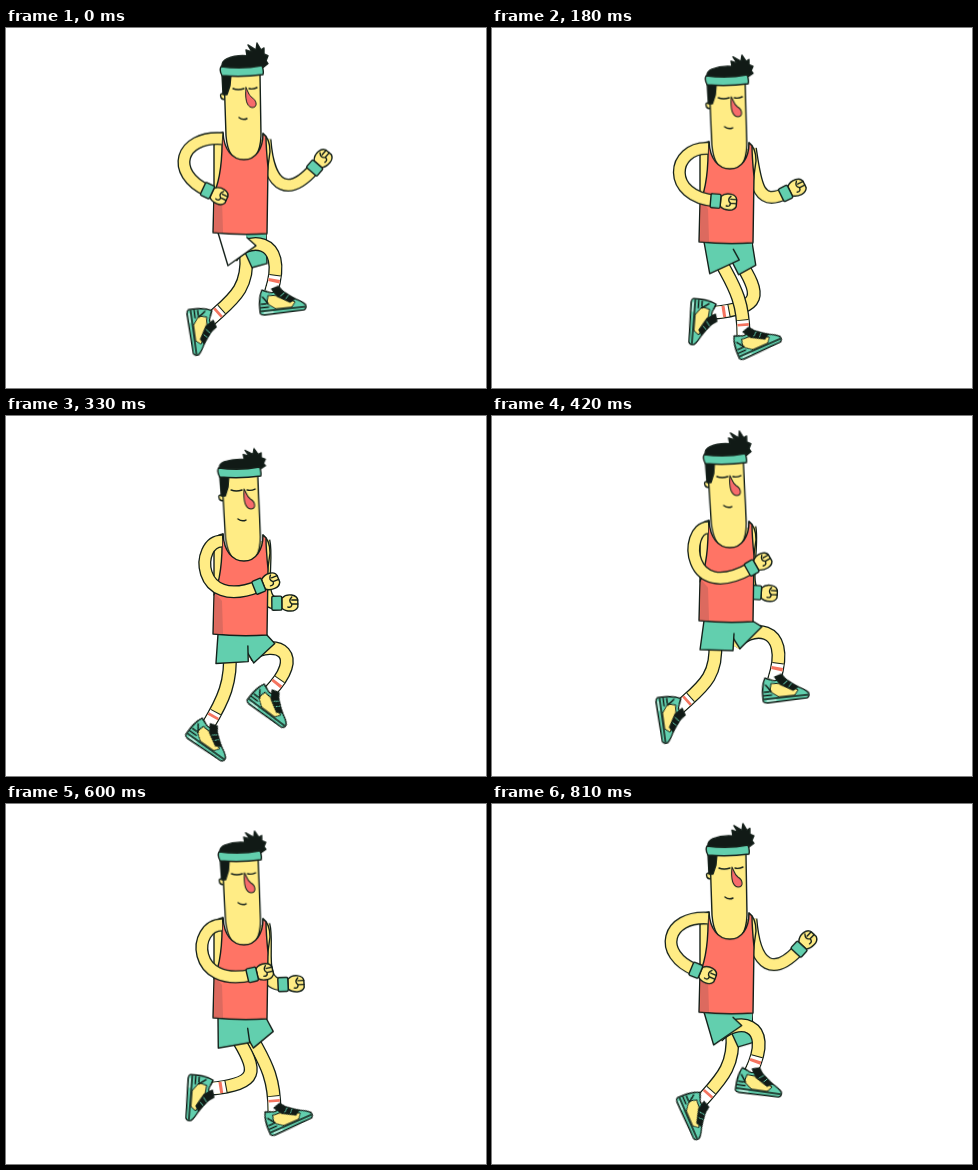
Write an HTML page without scripts that moves like this. It is 480 px wide and 360 px high and loops after 840 ms.

```html
<!DOCTYPE html>
<html lang="en">
<head>
<meta charset="utf-8">
<title>Runner</title>
<style>
html, body { margin: 0; width: 100%; height: 100%; overflow: hidden; background: #fff; }
svg { display: block; width: 480px; height: 360px; }

.ink { stroke: #14201a; stroke-width: 1.4; stroke-linejoin: round; stroke-linecap: round; }
.line { fill: none; }
.skin { fill: #ffec85; }
.teal { fill: #62cfae; }
.red { fill: #ff7465; }
.black { fill: #111a16; }

/* limbs are layered strokes along one moving centreline */
.limb path { fill: none; stroke-width: 11.4; }
.limb .edge { stroke: #14201a; stroke-width: 14; }
.limb .tube { stroke: #ffec85; }
.limb .sock { stroke: #fff; stroke-dasharray: 0 81 19; }
.limb .stripe { stroke: #f4745f; stroke-dasharray: 0 85 3.5 11.5; }
.limb .cuff { stroke: #14201a; stroke-dasharray: 0 80 1.2 18.8; }
.arm .edge { stroke-width: 13; }
.arm .tube { stroke-width: 10.4; }

/* both legs share one stride, half a cycle apart */
.leg path { animation: stride .84s linear var(--phase, 0s) infinite; }
.leg .foot { animation: step .84s linear var(--phase, 0s) infinite; }
.leg.far { --phase: -.42s; }
@keyframes stride {
  0%, 100% { d: path("M225 230C238 208 284 206 265 264"); }
  10.7% { d: path("M226 224C252 226 270 246 267 283"); }
  21.4% { d: path("M229 234C240 255 252 270 252 307"); }
  32.1% { d: path("M224 240C226 268 224 292 212 322"); }
  50% { d: path("M223 226C226 262 208 272 187 292"); }
  60.7% { d: path("M226 222C240 268 226 272 188 279"); }
  71.4% { d: path("M230 232C252 268 254 280 203 285"); }
  85.7% { d: path("M225 242C262 226 282 250 240 280"); }
}
@keyframes step {
  0%, 100% { transform: translate(265px, 264px) rotate(-6deg); }
  10.7% { transform: translate(267px, 283px) rotate(-18deg); }
  21.4% { transform: translate(252px, 307px) rotate(-24deg); }
  32.1% { transform: translate(212px, 322px) rotate(3deg); }
  50% { transform: translate(187px, 292px) rotate(82deg); }
  60.7% { transform: translate(188px, 279px) rotate(105deg); }
  71.4% { transform: translate(203px, 285px) rotate(95deg); }
  85.7% { transform: translate(240px, 280px) rotate(52deg); }
}

/* arms, shorts and head swing to and fro once per stride */
.swing { animation: var(--move) .42s ease-in-out -.82s infinite alternate; }
.arm.near { --move: near-arm; }
.arm.far { --move: far-arm; }
.shorts.near { --move: near-shorts; }
.shorts.far { --move: far-shorts; }
.head { --move: lean; transform-origin: 238px 130px; }
@keyframes near-arm {
  from { d: path("M216 111C174 108 163 145 201 163"); animation-timing-function: ease-in; }
  55% { d: path("M216 112C184 112 182 172 242 165"); animation-timing-function: ease-out; }
  to { d: path("M216 112C192 112 194 190 260 152"); }
}
@keyframes far-arm {
  from { d: path("M259 112C263 165 285 168 309 140"); animation-timing-function: ease-in; }
  55% { d: path("M258 112C264 132 250 172 281 170"); animation-timing-function: ease-out; }
  to { d: path("M258 112C262 130 250 176 264 177"); }
}
@keyframes near-shorts {
  from { d: path("M212 205L222 238L250 218L241 210"); }
  to { d: path("M212 205L208 234L241 235L242 218"); }
}
@keyframes far-shorts {
  from { d: path("M260 205L261 236L246 240L230 205"); }
  to { d: path("M260 205L270 211L248 233L230 205"); }
}
@keyframes lean { to { transform: skewX(1.8deg); } }

/* two bounces per stride: slow landing, quick lift */
.bounce { animation: bounce .42s -.38s infinite; }
.hair { animation: squash .42s -.38s infinite; transform-origin: 238px 40px; }
.bounce, .hair { animation-timing-function: cubic-bezier(.6, 0, .7, 1); }
@keyframes bounce {
  from, to { transform: translateY(-2px); }
  53% { transform: translateY(18px); animation-timing-function: ease-in-out; }
}
@keyframes squash {
  53% { transform: scaleY(.75); animation-timing-function: ease-in-out; }
}
.blink { animation: blink .84s step-end infinite; }
.shorts.blink { animation: near-shorts .42s ease-in-out -.82s infinite alternate, blink .84s step-end infinite; }
@keyframes blink { from { fill: #fff; } 3.57%, to { fill: #62cfae; } }
</style>
</head>
<body>
<svg viewBox="0 0 480 360" xmlns="http://www.w3.org/2000/svg">
<defs>
  <!-- ankle at the origin, toe to the right -->
  <g id="shoe" class="ink">
    <path class="teal" d="M-9-3C-13 4-13 12-13 20Q-12 22-9 22L31 21Q34 20 33 16C30 12 25 10 21 8L8-3Q2 3-4-1Z"/>
    <path class="skin" stroke-width="1" d="M-3 3L6 4L23 12L19 17H3L-5 11Z"/>
    <path class="black" d="M1-3L8-5L12 1L23 9L18 12L6 5Z"/>
    <path class="line" d="M-12 18H32M-9 4L-4 11M-11 11H-6M-12 14.5H-4"/>
    <path d="M-9 20H0" stroke="#fff" stroke-width="1"/>
    <path d="M9 5L13 2M14 8L17 5" stroke="#62cfae" stroke-width="1"/>
  </g>
  <!-- wristband at the origin, following the forearm -->
  <marker id="hand" orient="auto" markerUnits="userSpaceOnUse" markerWidth="30" markerHeight="30" overflow="visible">
    <g class="ink">
      <path class="skin" d="M5-5Q9-9 15-8Q21-7 21-2L21 4Q19 8 14 8Q8 8 5 5Z"/>
      <path class="line" d="M21-3L15-3M21 1L15 1M15-6Q11-2 15 1Q15 5 11 4"/>
      <rect class="teal" x="-5" y="-7" width="10" height="14" rx="1.5"/>
    </g>
  </marker>
</defs>

<g class="bounce limb arm far">
  <path class="swing edge"/>
  <path class="swing tube" marker-end="url(#hand)"/>
</g>

<g class="limb leg far" transform="translate(17 0)">
  <path class="edge" pathLength="100"/>
  <path class="tube" pathLength="100"/>
  <path class="sock" pathLength="100"/>
  <path class="stripe" pathLength="100"/>
  <path class="cuff" pathLength="100"/>
</g>
<g class="leg far" transform="translate(17 0)"><g class="foot"><use href="#shoe"/></g></g>

<g class="bounce">
  <path class="shorts far swing teal ink"/>
  <path class="blink" d="M212 204H245L240 222H218Z"/>
  <path class="teal" d="M240 204H260V220H240Z"/>
</g>

<g class="limb leg near">
  <path class="edge" pathLength="100"/>
  <path class="tube" pathLength="100"/>
  <path class="sock" pathLength="100"/>
  <path class="stripe" pathLength="100"/>
  <path class="cuff" pathLength="100"/>
</g>
<g class="leg near"><g class="foot"><use href="#shoe"/></g></g>

<g class="bounce">
  <path class="shorts near blink ink"/>

  <path class="skin ink" d="M217 105Q208 106 208 118V166L218 150ZM257 106Q264 111 264 124L261 146Z"/>
  <g class="head swing ink">
    <path class="skin" d="M219 66Q213 65 215 70Q217 73 220 71"/>
    <path class="skin" d="M218 46L220 108Q222 134 238 134Q254 134 255 108L254 46Z"/>
    <path class="black" d="M216 47H225L224 58L221 67H217Z"/>
    <path class="hair black" d="M216 40Q215 34 221 31Q230 27 241 28L240 22L246 24L242 17L250 22L251 15L255 22L258 20V26L262 28L260 33L262 36L257 40Z"/>
    <path class="teal" d="M215 39Q236 42 256 38Q258 43 257 47Q236 50 216 48Q213 43 215 39Z"/>
    <path class="line" d="M227 61Q232 63 238 61M243 61Q247 62 251 60M233 90Q237 93 241 91"/>
    <path d="M240 60C239 70 240 79 246 80C252 80 251 73 246 70C242 67 242 63 240 60Z" fill="#f76b6b" stroke-width="1"/>
  </g>

  <path class="red ink" d="M217 105C218 122 226 132 238 132C250 132 257 121 257 106L260 109Q260 120 262 140L261 206Q234 208 207 205L208 166Q217 145 216 106Z"/>
  <path d="M209 164L216 172L217 205L208 204Z" fill="#dc6a5f"/>
</g>

<g class="bounce limb arm near">
  <path class="swing edge"/>
  <path class="swing tube" marker-end="url(#hand)"/>
</g>
</svg>
</body>
</html>
```
